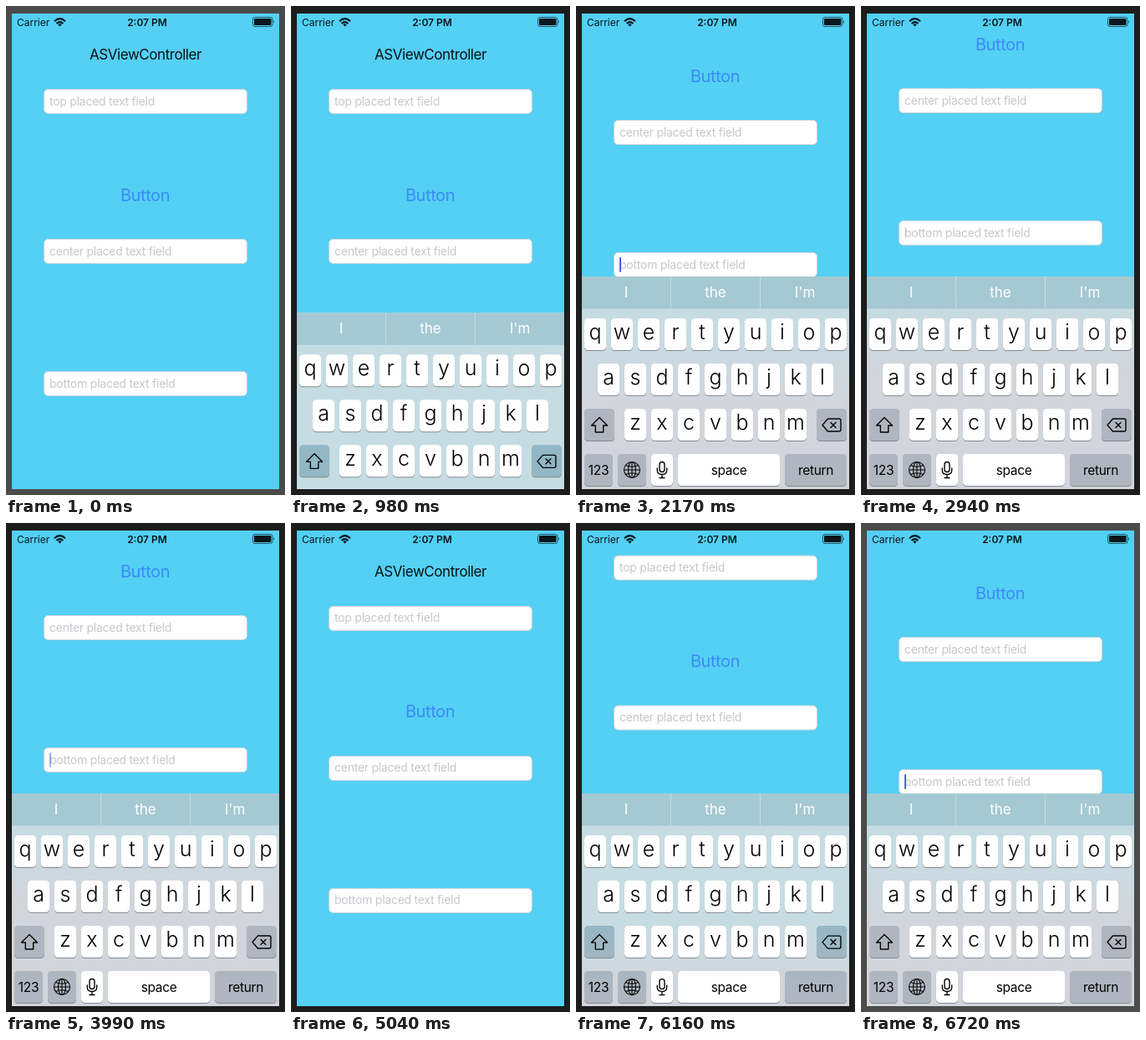
An HTML page that plays this animation: 334x584 px, repeating every 6.79 s.

```html
<!DOCTYPE html>
<html lang="en">
<head>
<meta charset="utf-8">
<title>Keyboard avoiding form</title>
<style>
  html, body { margin: 0; width: 100%; height: 100%; overflow: hidden; background: #1d1d1d; }
  svg { display: block; width: 334px; height: 584px; font-family: Inter, Roboto, sans-serif; }
  .mid { text-anchor: middle; }
  .hint { font-size: 14px; letter-spacing: -.25px; fill: #c7c7cd; }
  .letter { font-size: 25px; font-weight: 300; text-anchor: middle; }
  .label { font-size: 15.5px; letter-spacing: -.35px; text-anchor: middle; }
  .word { font-size: 17px; fill: #fff; text-anchor: middle; }
  .line { fill: none; stroke: #050505; stroke-width: 1.4; stroke-linejoin: round; stroke-linecap: round; }
</style>
</head>
<body>
<svg viewBox="0 0 334 584">
  <defs>
    <clipPath id="screen"><rect x="7" y="9" width="320" height="568"/></clipPath>
    <linearGradient id="board"><stop stop-color="#c6dce3"/><stop offset="1" stop-color="#d2d5db"/></linearGradient>
    <linearGradient id="bar"><stop stop-color="#a5c9d3"/><stop offset="1" stop-color="#b9c2cb"/></linearGradient>
    <linearGradient id="dim"><stop stop-color="#92b7c5"/><stop offset="1" stop-color="#b0b6c0"/></linearGradient>
  </defs>
  <rect id="bezel" width="334" height="584"/>
  <g clip-path="url(#screen)">
    <rect x="7" y="9" width="320" height="568" fill="#fff"/>
    <g id="page">
      <rect x="7" y="9" width="320" height="568" fill="#53d0f4"/>
      <text class="mid" x="167" y="64" font-size="17" letter-spacing="-.45" fill="#0b1114">ASViewController</text>
      <text class="mid" x="166.5" y="232.5" font-size="20" letter-spacing="-.4" fill="#3c8bf7">Button</text>
      <g id="fields"></g>
      <rect id="caret" x="52" y="442" width="2" height="18" rx="1" fill="#4a63e6"/>
    </g>
    <g id="keys"></g>
  </g>
  <g id="status" fill="#07161c">
    <text x="13" y="24" font-size="12">Carrier</text>
    <text class="mid" x="169" y="24" font-size="12" font-weight="600">2:07 PM</text>
    <g fill="none" stroke="#07161c" stroke-width="2.1">
      <path d="M58 18.2Q64.5 12 71 18.2"/>
      <path d="M60.6 20.9Q64.5 17.2 68.4 20.9"/>
    </g>
    <path d="M62.3 22.2Q64.5 20.3 66.7 22.2L64.5 24.5Z"/>
    <rect x="295.5" y="13.5" width="23.5" height="11" rx="2.5" fill="none" stroke="#07161c" stroke-opacity=".65"/>
    <rect x="297" y="15" width="20.5" height="8" rx="1.2"/>
    <path d="M320 17.2q1.6 1.8 0 3.6z"/>
  </g>
</svg>
<script>
const LOOP = 6790, STEP = 70;
const BOTTOM = 577, BOARD = 254, FLUSH = 142, REST = 168;
const $ = id => document.getElementById(id);

const field = (y, hint) => `<rect x="45.5" y="${y + .5}" width="243" height="29" rx="5" fill="#fff" stroke="#c9d3d8"/>
  <text class="hint" x="52" y="${y + 19.5}">${hint} placed text field</text>`;
$('fields').innerHTML = field(99, 'top') + field(278, 'center') + field(436, 'bottom');

const key = (x, y, w, fill = '#fff') =>
  `<rect x="${x}" y="${y + 1}" width="${w}" height="38" rx="4.5" fill="#848a90"/>
   <rect x="${x}" y="${y}" width="${w}" height="38" rx="4.5" fill="${fill}"/>`;
const row = (letters, x, y) => [...letters].map((c, i) =>
  key(x + i * 32, y, 26) + `<text class="letter" x="${x + i * 32 + 13}" y="${y + 25}">${c}</text>`).join('');
const label = (x, text) => `<text class="label" x="${x}" y="236.5">${text}</text>`;
const dim = 'url(#dim)';

$('keys').innerHTML = `
  <rect x="7" width="320" height="${BOARD}" fill="url(#board)"/>
  <rect x="7" width="320" height="38.5" fill="url(#bar)"/>
  <path d="M113.5 0V38M220.5 0V38" stroke="#c6dce3"/>
  ${['I', 'the', "I'm"].map((w, i) => `<text class="word" x="${60 + i * 107}" y="24.5">${w}</text>`).join('')}
  ${row('qwertyuiop', 10, 50)}${row('asdfghjkl', 26, 104)}${row('zxcvbnm', 58, 158)}
  ${key(10, 158, 36, dim)}${key(288, 158, 36, dim)}
  ${key(10, 212, 34, dim)}${key(50, 212, 34, dim)}${key(90, 212, 26)}${key(122, 212, 122)}${key(250, 212, 74, dim)}
  ${label(27, '123')}${label(183, 'space')}${label(287, 'return')}
  <g class="line">
    <path d="M28 168.5L37.5 178H32.7V186H23.3V178H18.5Z"/>
    <path d="M295 177.5L301.5 170H315Q317 170 317 172V183Q317 185 315 185H301.5ZM305 174.5l6 6m0-6l-6 6"/>
    <g stroke-width="1.1">
      <circle cx="67" cy="231" r="9.5"/><ellipse cx="67" cy="231" rx="4.5" ry="9.5"/>
      <path d="M57.5 231H76.5M67 221.5V240.5M59.5 225.5Q67 229 74.5 225.5M59.5 236.5Q67 233 74.5 236.5"/>
    </g>
    <rect x="100" y="221.5" width="6" height="12" rx="3"/>
    <path d="M97.3 229V231.5Q97.3 236.5 103 236.5T108.7 231.5V229M103 236.5V240.5M100 240.5H106"/>
  </g>`;

const clamp = v => Math.min(1, Math.max(0, v));
const ramp = (t, a, b) => clamp((t - a) / (b - a));
const ease = (t, a, b) => { const p = ramp(t, a, b); return p * p * (3 - 2 * p); };
// Critically damped spring from 0 to 1
const spring = (t, start) => {
  const w = Math.max(0, t - start) * .018;
  return 1 - (1 + w) * Math.exp(-w);
};

const SHOW = 802, HIDE = 4370, AGAIN = 5587;

function scrollAt(t) {
  if (t >= AGAIN) return FLUSH * ease(t, AGAIN + 420, AGAIN + 760);
  if (t >= HIDE) return REST * (1 - spring(t, HIDE));
  return FLUSH * ease(t, SHOW + 420, SHOW + 760)
    + 40 * ease(t, 2240, 2800) - 50 * ease(t, 2900, 3220) + 36 * ease(t, 3240, 3570);
}

function caretAt(t) {
  const start = t >= AGAIN ? AGAIN : 50;
  if (t < SHOW || (t >= HIDE && t < AGAIN)) return 0;
  const p = (t - start) % 1000 / 1000;
  return p < .7 ? 1 - ramp(p, .55, .7) : ramp(p, .88, 1);
}

function draw(t) {
  const lift = t >= AGAIN ? spring(t, AGAIN) : spring(t, SHOW) - spring(t, HIDE);
  const top = BOTTOM - BOARD * lift;
  const scroll = scrollAt(t);
  $('page').setAttribute('transform', `translate(0 ${-scroll.toFixed(2)})`);
  $('keys').setAttribute('transform', `translate(0 ${top.toFixed(2)})`);
  $('caret').setAttribute('opacity', caretAt(t));

  // The board is translucent: its tint follows the blurred lower edge of the page
  const edge = scroll < 1 ? 1000 : BOTTOM - scroll - top;
  for (const id of ['board', 'bar', 'dim']) {
    const g = $(id);
    g.setAttribute('gradientUnits', 'userSpaceOnUse');
    g.setAttribute('x1', 0);
    g.setAttribute('x2', 0);
    g.setAttribute('y1', edge - 45);
    g.setAttribute('y2', edge + 45);
  }

  const focus = ramp(t, 500, 700) - ramp(t, 6500, 6700);
  const shade = Math.round(75 - 46 * focus);
  $('bezel').setAttribute('fill', `rgb(${shade},${shade},${shade})`);
}

const began = performance.now();
function tick() {
  const t = (performance.now() - began) % LOOP;
  draw(Math.floor(t / STEP) * STEP);
  requestAnimationFrame(tick);
}
tick();
</script>
</body>
</html>
```
